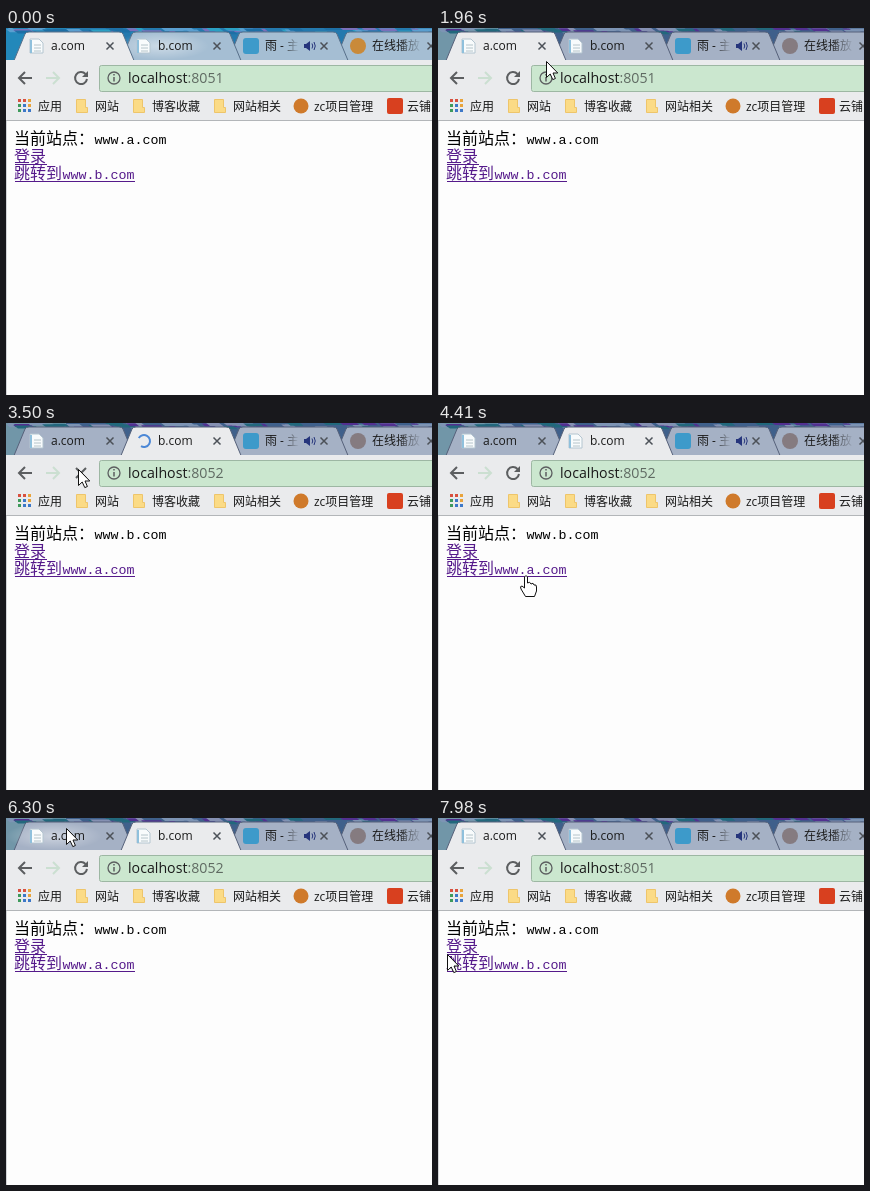
Animation of 426 by 367 pixels, one loop 8 s. Source, as an HTML page:

```html
<!DOCTYPE html>
<html lang="zh-CN">
<head>
<meta charset="utf-8">
<title>Two sites</title>
<style>
html, body { margin: 0; width: 100%; height: 100%; overflow: hidden; background: #fdfdfd; }
svg {
  display: block; width: 426px; height: 367px;
  --bar: #eaebed; --tab: #a5bed3; --edge: #58708a; --media: #c98a3a;
  --left: #2388ba; --right: #2479ae;
  --w0: #5a9fd0; --w1: #1d6fa5; --w2: #7a70bb; --w3: #2ba0c4;
}
svg.dim {
  --tab: #a5b1c5; --edge: #56617a; --media: #857b80;
  --left: #7196a8; --right: #3f608b;
  --w0: #7d94b4; --w1: #22687c; --w2: #523090; --w3: #8590b2;
}
text { font: 12px "Open Sans", "Noto Sans CJK SC", "Noto Sans CJK", sans-serif; fill: #1a1a1a; white-space: pre; }
.url { font-size: 14.2px; }
.page text { font: 300 16px "Noto Sans CJK SC", "Noto Sans CJK", sans-serif; fill: #000; }
.page .mono { font: 13.333px "Liberation Mono", monospace; }
.page .link, .page .link tspan { fill: #551a8b; }
.line { fill: none; stroke: #5c5e60; stroke-width: 2; }
</style>
</head>
<body>
<svg id="stage" viewBox="0 0 426 367">
  <defs>
    <radialGradient id="glow">
      <stop offset="0" stop-color="#fff" stop-opacity=".45"/>
      <stop offset="1" stop-color="#fff" stop-opacity="0"/>
    </radialGradient>
    <linearGradient id="fadeShort" gradientUnits="userSpaceOnUse" x1="276" x2="293">
      <stop stop-color="#1a1a1a"/><stop offset="1" stop-color="#1a1a1a" stop-opacity="0"/>
    </linearGradient>
    <linearGradient id="fadeLong" gradientUnits="userSpaceOnUse" x1="392" x2="416">
      <stop stop-color="#1a1a1a"/><stop offset="1" stop-color="#1a1a1a" stop-opacity="0"/>
    </linearGradient>
  </defs>
  <rect width="426" height="367" fill="#fdfdfd"/>
  <g id="wallpaper"></g>
  <g id="tabs"></g>

  <rect y="32" width="426" height="61" fill="var(--bar)"/>
  <path class="line" d="M26 50H13M19 44L13 50L19 56"/>
  <path class="line" style="stroke:#cbdfd1" d="M40 50H53M47 44L53 50L47 56"/>
  <circle id="press" cx="75" cy="50" r="7" fill="#b4b6b8"/>
  <g id="reload">
    <path class="line" d="M79.5 46A6 6 0 1 0 81 51"/>
    <path d="M82 43V49H76Z" fill="#5c5e60"/>
  </g>
  <path id="stop" class="line" d="M70 45L80 55M80 45L70 55"/>
  <rect x="93.5" y="37.5" width="340" height="26" rx="2" fill="#cbe7cf" stroke="#9db7a3"/>
  <circle cx="108" cy="50" r="6" class="line" style="stroke-width:1.3"/>
  <path class="line" style="stroke-width:1.5" d="M108 49V53.5M108 46V47.6"/>
  <text class="url" x="122" y="55">localhost<tspan id="port" fill="#5f6a62"></tspan></text>
  <g id="bookmarks"></g>
  <path d="M0 92.5H426" stroke="#b3b6b9"/>
  <path d="M.5 93V367" stroke="#d3d5d8"/>

  <g class="page">
    <text x="8" y="116">当前站点：<tspan id="here" class="mono" x="88.5"></tspan></text>
    <text class="link" x="8" y="134">登录</text>
    <text class="link" x="8" y="151">跳转到<tspan id="there" class="mono" x="56.5"></tspan></text>
    <path d="M9 136.5H41M9 153.5H129" stroke="#551a8b"/>
  </g>

  <path id="arrow" d="M.5 .5V16.5L4.2 13L6.8 18.6L9.4 17.5L7 12H11.8Z" fill="#fff" stroke="#111"/>
  <path id="hand" fill="#fff" stroke="#111" stroke-linejoin="round"
    d="M-1.5 13V2Q0 -1 1.5 2V8Q4 6 5 9Q7.5 7 8 10Q10.5 9 10.5 12V16L8.5 21.5H-.5L-5 14Q-6.5 11 -4 11Z"/>
</svg>
<script>
const $ = id => document.getElementById(id);
const TICK = 70, LOOP = 8000;

// time, x, y of the pointer's hot spot
const POINTER = [
  [0, 131, -30], [280, 131, -20], [910, 78, 47], [1750, 78, 47], [2240, 153, 11],
  [2380, 153, 11], [2590, 47, 66], [3010, 72, 46], [3640, 72, 46], [4060, 87, 152],
  [4340, 87, 152], [4410, 88, 152], [4480, 88, 149], [5810, 88, 149], [6300, 60, 10],
  [6580, 60, 10], [6860, 79, 38], [7000, 72, 44], [7140, 72, 49], [7420, 72, 49],
  [7770, -14, 139], [7840, -14, 139], [7910, 1, 139], [7980, 9, 136]
];
const LOADING = [[1120, 1330], [3360, 3570], [4690, 4830], [5460, 5670], [7140, 7350]];
const PRESSED = [[1050, 1120], [3290, 3360], [7070, 7140]];
const during = (spans, t) => spans.some(([from, to]) => t >= from && t < to);
const show = (el, on) => { el.style.display = on ? '' : 'none'; };

function drawWallpaper() {
  let seed = 11;
  const random = () => (seed = seed * 16807 % 2147483647) / 2147483647;
  let out = '<rect width="426" height="32" fill="var(--left)"/><rect x="60" width="366" height="32" fill="var(--right)"/>';
  for (let i = 0; i < 70; i++) {
    const x = random() * 426, y = random() * 5 - 1, w = 4 + random() * 16;
    out += `<path d="M${x} ${y}h${w}l4 3h${-w}z" fill="var(--w${i % 4})"/>`;
  }
  $('wallpaper').innerHTML = out;
}

const docIcon = x => `<g class="icon">
  <path d="M${x + 1} 11H${x + 10}L${x + 14} 15V25H${x + 1}Z" fill="#f8fbfc" stroke="#b4c5d0"/>
  <path d="M${x + 2} 12V25" stroke="#8fc0dc" stroke-width="2"/>
  <path d="M${x + 5} 17H${x + 12}M${x + 5} 20H${x + 12}M${x + 5} 23H${x + 12}" stroke="#b5c4ca"/></g>
  <path class="spinner line" d="M${x + 8} 12A6 6 0 1 1 ${x + 2} 18" style="stroke:#4b87d6"/>`;

const speaker = `<path d="M298 16h2l4-3v10l-4-3h-2z" fill="#26357c"/>
  <path d="M306 15.5q1.5 2.5 0 5M308 14q2.5 4 0 8" fill="none" stroke="#26357c"/>`;

function drawTabs() {
  const tabs = [
    { icon: docIcon(23), title: '' },
    { icon: docIcon(130), title: '' },
    { icon: '<rect x="237" y="10" width="16" height="16" rx="3" fill="#3d9aca"/>' + speaker,
      title: '雨 - 主', fill: 'url(#fadeShort)' },
    { icon: '<circle cx="352" cy="18" r="8" fill="var(--media)"/>',
      title: '在线播放', fill: 'url(#fadeLong)' }
  ];
  $('tabs').innerHTML = tabs.map(({ icon, title, fill = '#1a1a1a' }, i) => {
    const x = 8 + i * 107;
    return `<g><path class="shape" stroke="var(--edge)" d="M${x} 32.5L${x + 11} 6Q${x + 12} 4 ${x + 15} 4
      H${x + 105}Q${x + 108} 4 ${x + 109} 6L${x + 120} 32.5"/>
      <ellipse class="glow" cx="${x + 40}" cy="18" rx="48" ry="14" fill="url(#glow)"/>${icon}
      <text class="title" x="${x + 37}" y="22" style="fill:${fill}">${title}</text>
      <path d="M${x + 92.5} 14.5l7 7m0-7l-7 7" stroke="#4c5158" stroke-width="1.5"/></g>`;
  }).join('');
  return [...$('tabs').children].map(el => ({
    el,
    shape: el.querySelector('.shape'),
    glow: el.querySelector('.glow'),
    title: el.querySelector('.title'),
    icon: el.querySelector('.icon'),
    spinner: el.querySelector('.spinner')
  }));
}

function drawBookmarks() {
  const label = (x, s) => `<text x="${x}" y="83">${s}</text>`;
  const folder = x => `<path d="M${x + .5} 71.5h9v8h2v5h-11z" fill="#fbdb86" stroke="#eec56a"/>`;
  const colors = ['#d8503f', '#d8503f', '#e8a33b', '#3e9a5b', '#3d78c8', '#e8a33b', '#3e9a5b', '#3d78c8', '#3d78c8'];
  const dots = colors.map((c, i) =>
    `<rect x="${12 + i % 3 * 5}" y="${71 + Math.floor(i / 3) * 5}" width="3" height="3" fill="${c}"/>`).join('');
  $('bookmarks').innerHTML = dots + label(32, '应用')
    + [[70, '网站'], [127, '博客收藏'], [208, '网站相关']].map(([x, s]) => folder(x) + label(x + 19, s)).join('')
    + '<circle cx="295" cy="78" r="7.5" fill="#cf7a2b"/>' + label(308, 'zc项目管理')
    + '<rect x="381" y="70" width="16" height="16" rx="2" fill="#d8401f"/>' + label(401, '云铺');
}

function pointerAt(t) {
  const next = POINTER.findIndex(key => key[0] > t);
  if (next < 0) return POINTER[POINTER.length - 1].slice(1);
  const [t0, x0, y0] = POINTER[next - 1], [t1, x1, y1] = POINTER[next];
  const p = (t - t0) / (t1 - t0), ease = p * p * (3 - 2 * p);
  return [Math.round(x0 + (x1 - x0) * ease), Math.round(y0 + (y1 - y0) * ease)];
}

drawWallpaper();
drawBookmarks();
const tabs = drawTabs();
let activeBefore = -1;

function render(t) {
  const active = t >= 2310 && t < 6440 ? 1 : 0;
  const jumped = t >= 4760 && t < 5530;
  const site = active && !jumped ? 'b' : 'a';
  const loading = during(LOADING, t);
  $('stage').classList.toggle('dim', t >= 1050);

  if (active !== activeBefore) {
    for (const i of [3, 2, 1 - active, active]) $('tabs').append(tabs[i].el);
    activeBefore = active;
  }
  const hovered = t < 70 || (t >= 2100 && t < 2310) ? 1 : t >= 6160 && t < 6440 ? 0 : -1;
  tabs.forEach((tab, i) => {
    tab.shape.setAttribute('fill', i === active ? 'var(--bar)' : 'var(--tab)');
    show(tab.glow, i === hovered);
    if (!tab.icon) return;
    const busy = loading && i === active;
    show(tab.icon, !busy);
    show(tab.spinner, busy);
    tab.spinner.setAttribute('transform', `rotate(${t * .6} ${31 + i * 107} 18)`);
  });
  tabs[0].title.textContent = 'a.com';
  tabs[1].title.textContent = jumped ? 'a.com' : 'b.com';

  $('port').textContent = site === 'a' ? ':8051' : ':8052';
  $('here').textContent = `www.${site}.com`;
  $('there').textContent = `www.${site === 'a' ? 'b' : 'a'}.com`;
  show($('press'), during(PRESSED, t));
  show($('reload'), !loading);
  show($('stop'), loading);

  const [x, y] = pointerAt(t);
  const overLink = t >= 4060 && t < 5880;
  show($('arrow'), !overLink);
  show($('hand'), overLink);
  $(overLink ? 'hand' : 'arrow').setAttribute('transform', `translate(${x} ${y})`);
}

function frame() {
  render(Math.floor(performance.now() % LOOP / TICK) * TICK);
  requestAnimationFrame(frame);
}
frame();
</script>
</body>
</html>
```
